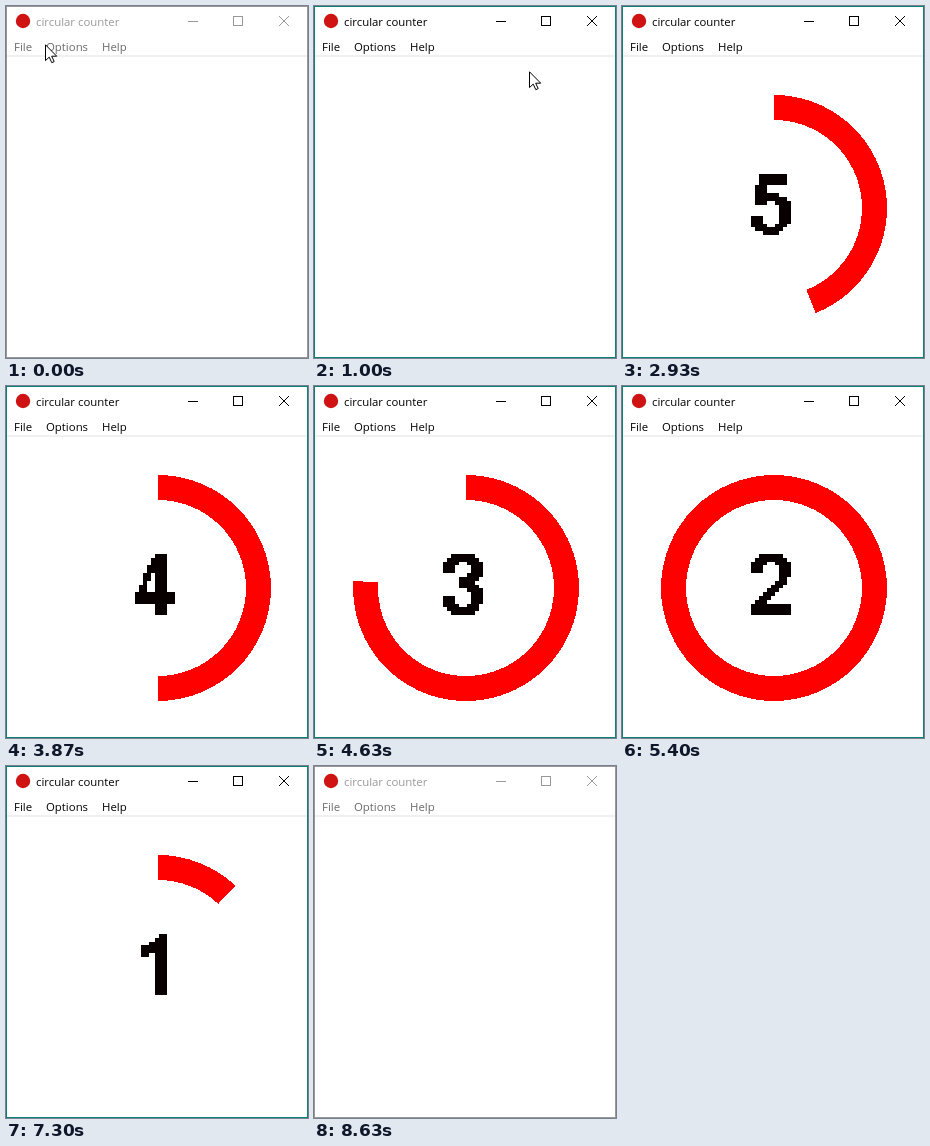
Write an HTML page that moves like this. It is 302 px wide and 352 px high and loops after 8.76 s.

```html
<!DOCTYPE html>
<html lang="en">
<head>
<meta charset="utf-8">
<title>circular counter</title>
<style>
  html, body { margin: 0; width: 100%; height: 100%; overflow: hidden; background: #fff; }
  svg { display: block; width: 302px; height: 352px; }
  text { font: 11.4px "Open Sans", "Noto Sans", sans-serif; fill: #000; white-space: pre; }
  .crisp { shape-rendering: crispEdges; }
  .end { text-anchor: end; }
  .off { fill: #6d6d6d; }
  #frame { fill: none; stroke: #128078; }
  #buttons { fill: none; stroke: #000; }
  .idle #frame { stroke: #989898; }
  .idle #buttons { stroke: #999; }
  .idle #title { fill: #999; }
  .idle #bar text { fill: #6a6a6a; }
</style>
</head>
<body>
<svg id="win" viewBox="0 0 302 352">
  <rect width="302" height="352" fill="#fff"/>
  <circle cx="17" cy="15" r="7.2" fill="#cf1212"/>
  <text id="title" x="30" y="20">circular counter</text>
  <g id="buttons">
    <path class="crisp" d="M182 15.5H192M227.5 10.5H236.5V19.5H227.5Z"/>
    <path d="M273 10L283 20M283 10L273 20"/>
  </g>
  <rect y="49" x="1" width="300" height="2" fill="#f0f0f0"/>

  <path id="ring" class="crisp" fill="#f00"/>
  <path id="digit" class="crisp" fill="#080000" fill-rule="evenodd" transform="translate(129 168) scale(4 3.82)"/>

  <rect id="hot" class="crisp" x="1.5" y="31.5" width="31" height="18" fill="#cce8ff" stroke="#99d1ff"/>
  <g id="bar">
    <text x="8" y="45">File</text>
    <text x="40" y="45">Options</text>
    <text x="96" y="45">Help</text>
  </g>
  <rect id="frame" class="crisp" x=".5" y=".5" width="301" height="351"/>

  <g id="menu">
    <rect class="crisp" x="1.5" y="50.5" width="174" height="129" fill="#f2f2f2" stroke="#ccc"/>
    <rect id="pick" x="4" y="53" width="169" height="22" fill="#91c9f7"/>
    <path class="crisp" d="M33 78.5H173M33 151.5H173" stroke="#d2d2d2"/>
    <text x="36" y="68">New</text><text class="end" x="156" y="68">F2</text>
    <text class="off" x="36" y="97">Password</text>
    <text x="36" y="119">Pause</text><text class="end" x="156" y="119">Ctrl+P</text>
    <text x="36" y="141">Players</text><text class="end" x="156" y="141">Ctrl+Y</text>
    <text x="36" y="170">Quit</text><text class="end" x="156" y="170">Alt+F4</text>
  </g>

  <path id="cursor" d="M.5 .8V16.6L4.2 13.1L6.8 18.7L9.2 17.6L6.7 12.2H11.7Z" fill="#fff" stroke="#000"/>
</svg>
<script>
const LOOP = 8760;
const COUNT_START = 71, COUNT_END = 223, STEPS = 50;
const $ = id => document.getElementById(id);
const show = (id, on) => $(id).setAttribute('visibility', on ? 'visible' : 'hidden');

// Digit outlines on a 10 x 16 grid
const arc = 'M2 0H8V1H9V2H10V6H9';
const hook = 'V3H6V2H4V3H3V5H0V2H1V1H2Z';
const digits = {
  5: 'M2 0H9V3H4V5H7V6H9V7H10V13H9V14H8V15H7V16H3V15H1V14H0V11H3V13H4V14H6V13H7V8H6V7H4V8H1V3H2Z',
  4: 'M5 0H8V10H10V13H8V16H5V13H0V10H1V8H2V5H3V3H4V1H5ZM5 5H4V7H3V10H5Z',
  3: arc + 'V7H8V8H9V9H10V13H9V15H8V16H2V15H1V14H0V11H3V13H4V14H6V13H7V10H6V9H4V6H6V5H7' + hook,
  2: arc + 'V8H8V9H7V10H6V11H5V12H4V13H10V16H0V13H1V12H2V11H3V10H4V9H5V8H6V7H7' + hook,
  1: 'M6 0H8V16H5V5H3.5V6H1.5V3H3.5V2H5V1H6Z'
};

// Pointer moves: [tick, x, y]
const entering = [[0, 39, 38], [4, 240, 72], [28, 238, 70], [37, 55, 28], [41, 19, 38],
                  [48, 19, 38], [54, 20, 37], [60, 63, 64], [71, 63, 64]];
const leaving = [[239, 63, 70], [251, 247, 354]];

function along(keys, n) {
  const i = keys.findIndex(k => k[0] > n);
  const [a, x, y] = keys[i - 1], [b, u, v] = keys[i];
  const p = (n - a) / (b - a), e = p * p * (3 - 2 * p);
  return [Math.round(x + (u - x) * e), Math.round(y + (v - y) * e)];
}

function ringPath(part) {
  const at = (r, turn) => {
    const a = turn * 2 * Math.PI;
    return (152 + r * Math.sin(a)).toFixed(2) + ' ' + (202 - r * Math.cos(a)).toFixed(2);
  };
  const R = 113, r = 88, half = part / 2;
  return `M${at(R, 0)}A${R} ${R} 0 0 1 ${at(R, half)}A${R} ${R} 0 0 1 ${at(R, part)}` +
         `L${at(r, part)}A${r} ${r} 0 0 0 ${at(r, half)}A${r} ${r} 0 0 0 ${at(r, 0)}Z`;
}

function draw(t) {
  const n = Math.floor(t * 0.03 + 0.1001); // 30 ticks per second
  $('win').classList.toggle('idle', n < 9 || n >= 259);

  const open = n >= 43 && n < COUNT_START;
  show('hot', n >= 40 && n < COUNT_START);
  $('hot').style.fill = open ? '#cce8ff' : '#e5f3ff';
  $('menu').style.opacity = open ? Math.min(1, (n - 42) / 5) : 0;
  $('pick').style.opacity = n >= 58 ? 1 : 0;

  const counting = n >= COUNT_START && n < COUNT_END;
  show('ring', counting);
  show('digit', counting);
  if (counting) {
    const step = Math.round((n - COUNT_START) * 1.645 + 0.5);
    $('ring').setAttribute('d', ringPath(1 - step % STEPS / STEPS));
    $('digit').setAttribute('d', digits[5 - Math.floor(step / STEPS)]);
  }

  const path = n < COUNT_START ? entering : n >= 239 && n < 251 ? leaving : null;
  show('cursor', path);
  if (path) $('cursor').setAttribute('transform', `translate(${along(path, n)})`);
}

function tick() {
  draw(performance.now() % LOOP);
  requestAnimationFrame(tick);
}
tick();
</script>
</body>
</html>
```
